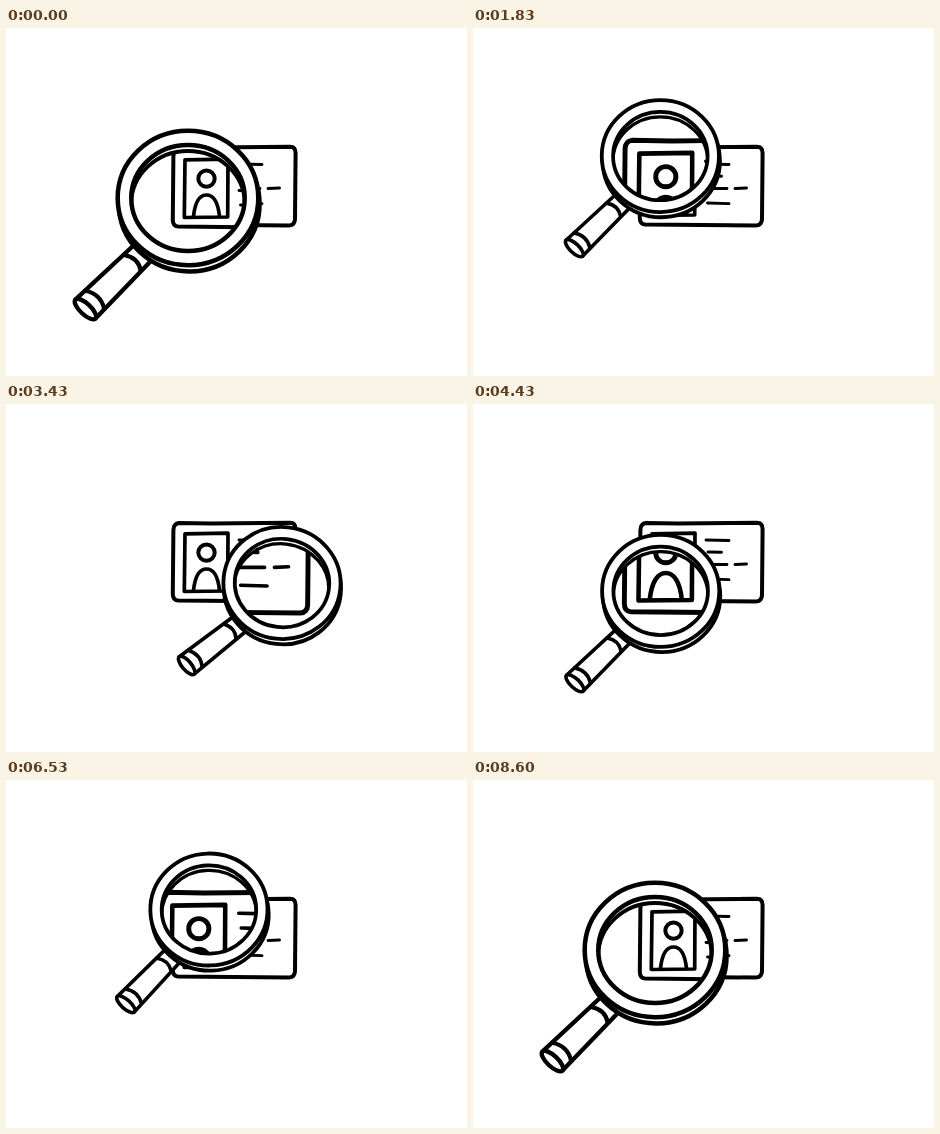
Animation, 461 px wide and 348 px high, one loop 8630 ms. Source, as an HTML page:

```html
<!DOCTYPE html>
<html lang="en">
<head>
<meta charset="utf-8">
<title>Magnifier over a card</title>
<style>
  html, body { margin: 0; width: 100%; height: 100%; overflow: hidden; background: #fff; }
  svg { display: block; width: 461px; height: 348px; }
  .ink { stroke: #000; fill: none; stroke-linecap: round; stroke-linejoin: round; }
  .paper { fill: #fff; }
</style>
</head>
<body>
<svg viewBox="0 0 461 348">
  <defs>
    <g id="card" class="ink">
      <path stroke-width="4" d="M173 119 L205 119.5 L284 118.8 Q289.6 119 289.6 125 L289 191 Q289 197 283 197.6 L172 196.6 Q166.8 196 166.8 190 L167.4 126 Q167.6 119.6 173 119Z"/>
      <path stroke-width="3.7" d="M179 129.8 L222 129.2 L221.7 187 L178.3 187.5Z"/>
      <circle stroke-width="4" cx="200.5" cy="148.6" r="8.2"/>
      <path stroke-width="3.7" d="M187.5 186.5 C189 172 194 165 200.5 165 C207 165 212 172 213.5 186.5"/>
      <path stroke-width="2.9" d="M233 136 L256 136.5 M235 148 L248.5 148.3 M233 160.5 L254 160.5 M262 160.5 L273.5 160 M234.5 175 L256 175.6"/>
    </g>
    <ellipse id="hole" rx="47.3" ry="44.2"/>
    <clipPath id="lensClip"><use href="#hole" id="lens"/></clipPath>
    <clipPath id="holeClip"><use href="#hole"/></clipPath>
  </defs>

  <use href="#card"/>

  <g class="tool">
    <g class="ink" transform="rotate(133.4)" stroke-width="3.6">
      <path class="paper" d="M52 5.5 L126 10.5 V-12.5 L52 -13.5"/>
      <path d="M71 6.5 Q64.5 -3.5 71 -12.6 M115 9.6 Q108 -1.5 115 -12"/>
      <ellipse class="paper" cx="126" cy="-1" rx="4.5" ry="11.5"/>
    </g>
    <g class="ink" stroke-width="3.8">
      <ellipse class="paper" cx="1" cy="5.2" rx="58.6" ry="56"/>
      <ellipse class="paper" rx="58.6" ry="56"/>
    </g>
    <use href="#hole" class="paper"/>
  </g>

  <g clip-path="url(#lensClip)">
    <use href="#card" id="zoomed"/>
  </g>

  <g class="tool">
    <g clip-path="url(#holeClip)">
      <path class="paper" fill-rule="evenodd" d="M-60 -60 H60 V60 H-60Z M-47.3 5 a47.3 44.2 0 1 0 94.6 0 a47.3 44.2 0 1 0 -94.6 0Z"/>
      <use href="#hole" y="5" class="ink" stroke-width="3.2"/>
    </g>
    <use href="#hole" class="ink" stroke-width="3.7"/>
  </g>
</svg>
<script>
  const LOOP = 8630;
  const REST = 8600;
  const GROW = 1500;

  // Stops of the lens centre along its sweep over the card
  const stops = [
    { t: 0, x: 182, y: 170 },
    { t: 1750, x: 185, y: 128 },
    { t: 2660, x: 280, y: 135.5 },
    { t: 3430, x: 276, y: 179 },
    { t: 4350, x: 186, y: 187 },
    { t: 5330, x: 276.5, y: 177 },
    { t: 5850, x: 280, y: 140 },
    { t: 6530, x: 203, y: 129.5 },
    { t: 7130, x: 181.5, y: 143.5 },
    { t: REST, x: 182, y: 170 }
  ];

  const ease = u => u * u * (3 - 2 * u);

  const slope = (i, axis) =>
    (stops[i + 1][axis] - stops[i][axis]) / (stops[i + 1].t - stops[i].t);

  // Monotone tangent: flat at turning points and at both ends
  function tangent(i, axis) {
    if (i === 0 || i === stops.length - 1) return 0;
    const a = slope(i - 1, axis), b = slope(i, axis);
    return a * b > 0 ? 2 * a * b / (a + b) : 0;
  }

  function along(t, i, axis) {
    const p = stops[i], q = stops[i + 1];
    const h = q.t - p.t, u = (t - p.t) / h, v = 1 - u;
    return p[axis] + (q[axis] - p[axis]) * ease(u)
      + h * u * v * (v * tangent(i, axis) - u * tangent(i + 1, axis));
  }

  const tools = document.querySelectorAll('.tool');
  const lens = document.getElementById('lens');
  const zoomed = document.getElementById('zoomed');

  function draw(time) {
    const t = Math.min(time % LOOP, REST);
    const i = stops.findIndex((s, k) => k > 0 && t <= s.t) - 1;
    const x = along(t, i, 'x'), y = along(t, i, 'y');

    // The lens is raised at both ends of the loop; raised means larger, with less zoom
    const raised = ease(Math.max(0, 1 - Math.min(t, REST - t) / GROW));
    const size = 1 + 0.2 * raised;
    const zoom = 1.23 - 0.23 * raised;

    // The handle tilts most on the right, away from the middle height
    const tilt = (y - 160) / 3 * (x - 188) / 90;

    const place = `translate(${x} ${y}) rotate(${tilt}) scale(${size})`;
    for (const part of [...tools, lens]) part.setAttribute('transform', place);
    zoomed.setAttribute('transform',
      `translate(234 ${148 + 2 * raised}) scale(${zoom}) translate(-234 -148)`);
  }

  const start = performance.now();
  function tick() {
    draw(performance.now() - start);
    requestAnimationFrame(tick);
  }
  tick();
</script>
</body>
</html>
```
